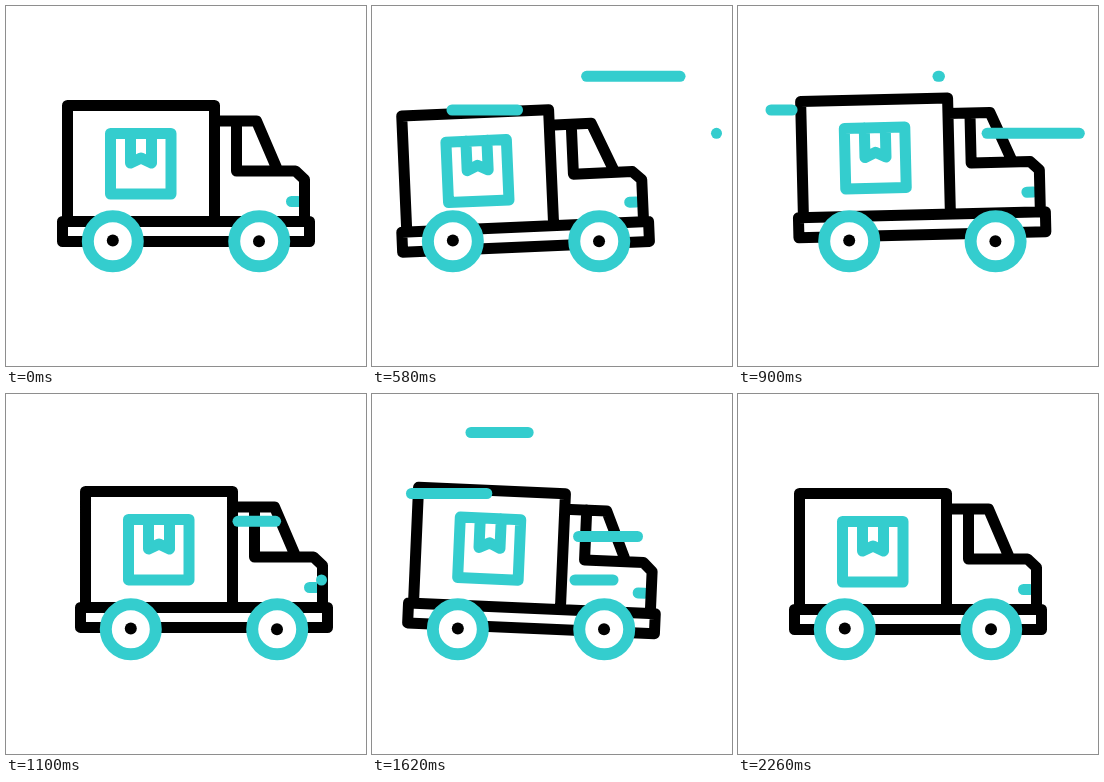
Animation of 360 by 360 pixels, one loop 2.4 s. Source, as an HTML page:

```html
<!DOCTYPE html>
<html lang="en">
<head>
<meta charset="utf-8">
<title>Delivery truck</title>
<style>
  html, body { margin: 0; height: 100%; overflow: hidden; background: #fff; }
  svg { display: block; width: 100%; height: 100%; }
  path { fill: none; stroke-width: 11; stroke-linecap: round; stroke-linejoin: round; }
  .teal { stroke: #34cdce; }
  .black { stroke: #000; }
  .wheel { fill: #fff; stroke: #34cdce; stroke-width: 12; }
</style>
</head>
<body>
<svg viewBox="0 0 360 360">
  <g id="body">
    <path class="teal" d="M104.5 127.5H165V188H104.5ZM124.5 127.5V157L135 152L145.5 157V127.5M285.5 195.5H292"/>
    <path class="black" d="M56.5 215.5H303.5V235.5H56.5ZM61.5 215.5V99.5H208.5V215.5M208.5 115H250.5L271.5 164M230.5 115V165H289.5L298.5 173.5V215.5"/>
  </g>
  <g id="wheels">
    <circle class="wheel" cx="106.8" cy="235.3" r="25"/>
    <circle class="wheel" cx="253.2" cy="235.3" r="25"/>
    <circle cx="106.8" cy="234.5" r="6"/>
    <circle cx="253" cy="235.3" r="6"/>
  </g>
  <g id="lines"></g>
</svg>
<script>
const LOOP = 2400;
const START = 40, BEAT = 530;   // the truck changes direction on every beat
const LINE_LENGTH = 112.5;
const SWEEP = 400;              // time an end of a line needs to cross its path
const TAIL_DELAY = 255;
const DOT_TIME = 35;            // a line rests as a dot before it sweeps

const byId = id => document.getElementById(id);
const body = byId('body'), wheels = byId('wheels'), lines = byId('lines');

const ease = x => (1 - Math.cos(Math.PI * Math.min(1, Math.max(0, x)))) / 2;

function drawTruck(t) {
  // eased 0..1 progress that begins on a beat and lasts some beats
  const rise = (beat, length = 1) => ease(((t - START) / BEAT - beat) / length);

  const x = -26 * rise(0) + 44 * rise(1) - 39 * rise(2) + 21 * rise(3);
  const y = 5.3 * rise(0) - 12.1 * rise(1, 0.62) + 9.5 * rise(1.62, 0.76)
    - 7.1 * rise(2.38, 1.13) + 4.4 * rise(3.51, 0.68);
  const tilt = -2.5 * rise(0) + 5 * rise(1, 2) - 2.5 * rise(3);

  wheels.setAttribute('transform', `translate(${x} 0)`);
  body.setAttribute('transform', `translate(${x} ${y}) rotate(${tilt} 180 235.5)`);
}

// The head runs left along the path and the tail follows later.
function speedLine(start, right, y) {
  const path = document.createElementNS('http://www.w3.org/2000/svg', 'path');
  path.setAttribute('class', 'teal');
  lines.append(path);
  return t => {
    const age = t - start;
    const visible = age >= -DOT_TIME && age <= TAIL_DELAY + SWEEP;
    const end = delay => right - LINE_LENGTH * ease((age - delay) / SWEEP);
    path.setAttribute('d', visible ? `M${end(TAIL_DELAY)} ${y}H${end(0) - 0.01}` : '');
  };
}

const parts = [
  drawTruck,
  speedLine(275, 312.5, 70.3),
  speedLine(360, 145.5, 104),
  speedLine(603, 344.5, 127.3),
  speedLine(1124, 315.5, 186),
  speedLine(1168, 211.5, 38.5),
  speedLine(1210, 152, 99.5),
  speedLine(1415, 265.5, 142.5)
];

const startTime = performance.now();
function frame() {
  const t = (performance.now() - startTime) % LOOP;
  parts.forEach(draw => draw(t));
  requestAnimationFrame(frame);
}
frame();
</script>
</body>
</html>
```
